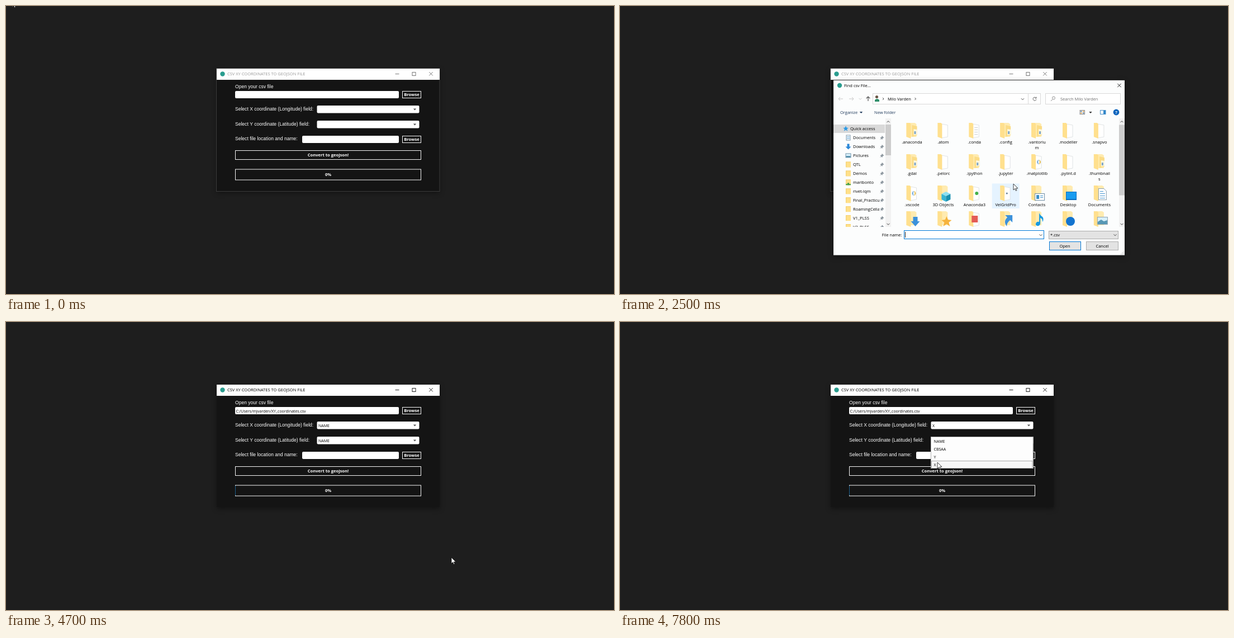
Recreate the animation shown at these times as an HTML page with a canvas. Size 1088 by 515 pixels, loop 8000 ms.

```html
<!DOCTYPE html>
<html lang="en">
<head>
<meta charset="utf-8">
<title>CSV to GeoJSON</title>
<style>
html, body { margin: 0; width: 1088px; height: 515px; overflow: hidden; background: #1e1e1e; }
canvas { display: block; }
</style>
</head>
<body>
<canvas id="stage" width="1088" height="515"></canvas>
<script>
const c = document.getElementById('stage').getContext('2d');
const LOOP = 8000, STEP = 100, SCROLL = 78.5;
const UI = "7.5px 'Open Sans', 'Noto Sans', sans-serif";
const FIELD = "7px 'Open Sans', 'Noto Sans', sans-serif";
const BOLD = "bold 7.6px 'Open Sans', 'Noto Sans', sans-serif";
const LABEL = "8.55px 'Liberation Sans', Arial, sans-serif";
const BLUE = '#0078d7', TEAL = '#2a9d8f', GOLD = '#f6b62c';

// time, x, y of the pointer tip
const POINTER = [
  [200, 11, -9.5], [300, 34, 22], [600, 260, 150], [900, 530, 202], [1100, 638, 158], [1300, 698, 158],
  [1400, 698, 158], [1500, 722, 160], [1800, 724, 162], [2000, 724, 165], [2500, 704, 318], [2700, 704, 318],
  [3000, 800, 342], [3100, 803, 343], [3300, 803, 343], [3500, 856, 352], [3800, 856, 352], [4300, 812, 440],
  [4500, 805, 430], [4600, 805, 430], [4700, 797, 421], [4800, 735, 266], [4900, 690, 270], [5000, 690, 270],
  [5100, 674, 230], [5500, 652, 190], [5600, 645, 184], [5700, 645, 184], [6200, 571, 226], [6700, 571, 227],
  [7000, 588, 213], [7400, 588, 213], [7800, 568, 251]
];

const FILES = [
  '.anaconda:sub .atom:page .conda:lines .config:sub .vantoriu|m:sub .modeller:page .snapvo:page',
  '.gdal:sub .pelorc:page .ipython:sub .jupyter:page .matplotlib:code .pylint.d:page .thumbnail|s:sub',
  '.vscode:code 3D_Objects:cube Anaconda3:ring VelGridPro:dot Contacts:card Desktop:screen Documents:doc',
  'Downloads:down Favorites:star lab2:red Links:link Music:note FluxCrate:disc Pictures:photo',
  'pipwin:page Python37:page Saved|Games:spade Searches:lens TRV_Lab|Install_-|Plumo_KD:page Videos:film XY~coordin|ates.csv:sheet'
].map(row => row.split(' ').map(item => {
  const [name, kind] = item.split(':');
  return { lines: name.split('|').map(s => s.replace(/_/g, ' ').replace('~', '_')), kind };
}));
const ROWS = [223, 279, 335, 381, 427];
const PINNED = ['Documents', 'Downloads', 'Pictures', 'QTL', 'Demos', 'maribonto', 'rivet-lqm',
  'Final_Practicum', 'RoamingCellars', 'V1_PLSS', 'V2_PLSS'];
const CHOICES = ['NAME', 'CBSAA', 'Y', 'X'];

const PAGE = ['#fff', 'M-3-12L8-10V11L-3 13Z'];
const STAR = 'M0-9L2.5-3 9-2 4 2 6 9 0 5-6 9-4 2-9-2-2.5-3Z';
const DOWN = 'M-4-8H4V0H8L0 9-8 0H-4Z';
// fill colour and outline, relative to the icon centre
const ART = {
  sub: [['#fbdc86', 'M0-10L9-8V8L0 11Z'], ['#fff8e0', 'M3-3L9-2V7L3 8Z'], ['#7ea6c8', 'M4 1H7V6H4Z']],
  page: [PAGE],
  lines: [PAGE, ['#c9ced3', 'M0-6H6V-5H0ZM0-2H6V-1H0ZM0 2H6V3H0ZM0 6H6V7H0Z']],
  code: [PAGE, ['#5b9bd5', 'M0 0L2-4H3L2 0 3 4H2Z'], ['#e0b43a', 'M7 0L5-4H4L5 0 4 4H5Z']],
  cube: [['#8ce0f2', 'M-3 1L5-3 13 1 5 5Z'], ['#35b5d5', 'M-3 1L5 5V15L-3 11Z'], ['#168fb0', 'M13 1L5 5V15L13 11Z']],
  ring: [PAGE, ['#43b049', 'M1 0a3 3 0 1 0 6 0a3 3 0 1 0-6 0Z']],
  dot: [PAGE, ['#6b8299', 'M.5 0a1.6 1.6 0 1 0 3.2 0a1.6 1.6 0 1 0-3.2 0Z']],
  card: [['#6e8da3', 'M-4 0H14V13H-4Z'], ['#fff', 'M-3 1H13V12H-3Z'], ['#3a8fc7', 'M-1 3H4V10H-1ZM6 4H11V5H6ZM6 7H11V8H6Z']],
  screen: [['#0b6fc0', 'M-4-3H15V12H-4Z'], ['#189cf0', 'M-3-2H14V10H-3Z']],
  doc: [['#8ba0ae', 'M-2-9H8L13-4V12H-2Z'], ['#fff', 'M-1-8H8L12-4V11H-1Z'], ['#4a97d0', 'M1-4H7V-3H1ZM1 0H10V1H1ZM1 4H10V5H1ZM1 8H10V9H1Z']],
  down: [['#3b91db', DOWN, 6, 4]],
  star: [['#f6b33c', STAR, 6, 4]],
  red: [PAGE, ['#e35b55', 'M-5-6H6V6H-5Z']],
  link: [['#3b91db', 'M-3-7H10V6L6 2Q0 6 0 13Q-7 4 1-3Z', 2, 0]],
  note: [['#1799e0', 'M4-11Q6-6 10-4Q13 0 10 5Q10-1 6-2V8Q5 13 0 12Q-4 10-1 6Q1 4 4 5Z']],
  disc: [['#1374cf', 'M-4 4a8 8 0 1 0 16 0a8 8 0 1 0-16 0Z']],
  photo: [['#8fa2ae', 'M-4-4H15V10H-4Z'], ['#d7f0fc', 'M-3-3H14V9H-3Z'], ['#5798b5', 'M-3 5L3 1 8 4 14 2V9H-3Z']],
  spade: [['#aab1b7', 'M-4-4L5-8 10 8 0 12Z'], ['#4b5359', 'M8-7Q18 1 14 6Q11 8 9 5L11 11H4L7 5Q2 8 1 3Q1-1 8-7Z']],
  lens: [['#a8a8a8', 'M1 4L3 6-6 13-8 11Z'], ['#7b98a8', 'M0-2a8 8 0 1 0 16 0a8 8 0 1 0-16 0Z'], ['#cdecfa', 'M1.5-2a6.5 6.5 0 1 0 13 0a6.5 6.5 0 1 0-13 0Z']],
  film: [['#263746', 'M-3-8H13V12H-3Z'], ['#3f88dd', 'M0-6H10V1H0Z'], ['#e2a63d', 'M0 3H10V10H0Z'],
    ['#fff', 'M-2-6h1v2h-1zm0 5h1v2h-1zm0 5h1v2h-1zm13-10h1v2h-1zm0 5h1v2h-1zm0 5h1v2h-1z']]
};

function rect(x, y, w, h, fill, line, width = 1) {
  if (fill) { c.fillStyle = fill; c.fillRect(x, y, w, h); }
  if (line) {
    c.strokeStyle = line; c.lineWidth = width;
    c.strokeRect(x + width / 2, y + width / 2, w - width, h - width);
  }
}
function text(s, x, y, color = '#000', font = UI, align = 'left') {
  c.font = font; c.fillStyle = color; c.textAlign = align;
  c.fillText(s, x, y);
}
function shape(d, x, y, fill, line, width = 1) {
  const p = new Path2D(d);
  c.save();
  c.translate(x, y);
  if (fill) { c.fillStyle = fill; c.fill(p); }
  if (line) { c.strokeStyle = line; c.lineWidth = width; c.stroke(p); }
  c.restore();
}
function disc(x, y, r, color) {
  c.fillStyle = color;
  c.beginPath(); c.arc(x, y, r, 0, 7); c.fill();
}
function clipped(x, y, w, h, draw) {
  c.save();
  c.beginPath(); c.rect(x, y, w, h); c.clip();
  draw();
  c.restore();
}
function shadowed(x, y, w, h, fill) {
  c.save();
  c.shadowColor = 'rgba(0,0,0,.4)'; c.shadowBlur = 9; c.shadowOffsetY = 3;
  rect(x, y, w, h, fill);
  c.restore();
}
const inside = (p, x, y, w, h) => p.x >= x && p.x < x + w && p.y >= y && p.y < y + h;
const chevron = (x, y, up, color = '#444') => shape(up ? 'M-2.5 1.2L0-1.3 2.5 1.2' : 'M-2.5-1.2L0 1.3 2.5-1.2', x, y, null, color);
const triangle = (x, y, color = '#333') => shape('M-2.7-1.4H2.7L0 1.6Z', x, y, color);

function pointerAt(t) {
  const i = POINTER.findIndex(k => k[0] > t);
  if (i === 0) return { x: POINTER[0][1], y: POINTER[0][2] };
  const a = POINTER[i < 0 ? POINTER.length - 1 : i - 1], b = i < 0 ? a : POINTER[i];
  const k = b === a ? 0 : (t - a[0]) / (b[0] - a[0]);
  return { x: a[1] + (b[1] - a[1]) * k, y: a[2] + (b[2] - a[2]) * k };
}

function input(x, y, w, h, value) {
  c.fillStyle = '#fff';
  c.beginPath(); c.roundRect(x, y, w, h, 2); c.fill();
  text(value, x + 1.5, y + 9.6, '#000', FIELD);
}
function combo(y, value) {
  input(556.5, y, 183, 13.5, '');
  text(value, 559, y + 9.7, '#000', FIELD);
  triangle(731.5, y + 6.8, '#555');
}
function button(label, x, y, w, h, p) {
  const hot = p && inside(p, x, y, w, h);
  rect(x, y, w, h, hot ? GOLD : '#141414', '#f4f4f4');
  text(label, x + w / 2, y + h / 2 + 2.9, hot ? '#111' : '#fff', BOLD, 'center');
}
function popup(y, p) {
  rect(556, y, 183.5, 57, '#fdfdfd', '#b4b4b4');
  CHOICES.forEach((name, i) => {
    const top = y + 1 + 14 * i;
    if (p.y >= top && p.y < top + 14) rect(557, top, 181.5, 14, '#f7f7f7', '#a9a9a9');
    text(name, 561.5, top + 9.6, '#000', FIELD);
  });
}

function mainWindow(t, p, dialog) {
  const active = t >= 4700 || t >= 1600 && t < 1800;
  const ink = active ? '#000' : '#999', glyph = active ? '#222' : '#777';
  const loaded = t >= 4700;
  const xOpen = t >= 5800 && t < 6500, yOpen = t >= 7200;
  const free = !dialog && !xOpen && !yOpen ? p : null;

  shadowed(377, 112, 399, 219, '#141414');
  if (!active) rect(376, 111, 400.5, 221, null, '#3b3b3b');
  rect(377, 112, 399, 20, '#fff');
  disc(387.5, 121.5, 4.2, TEAL);
  text('CSV XY COORDINATES TO GEOJSON FILE', 396, 124.4, ink);
  shape('M-3.5 0H3.5', 700, 121.5, null, glyph);
  rect(726.5, 118, 7, 7, null, glyph);
  shape('M-3.2-3.2L3.2 3.2M3.2-3.2L-3.2 3.2', 760.5, 121.3, null, glyph);

  text('Open your csv file', 410, 147, '#fff', LABEL);
  input(410, 152, 293, 13, loaded ? 'C:/Users/mjvarden/XY_coordinates.csv' : '');
  button('Browse', 709, 152, 34, 13, free);
  text('Select X coordinate (Longitude) field:', 410, 187, '#fff', LABEL);
  combo(178, t >= 6500 ? 'X' : loaded ? 'NAME' : '');
  text('Select Y coordinate (Latitude) field:', 410, 213.7, '#fff', LABEL);
  combo(205, loaded ? 'NAME' : '');
  text('Select file location and name:', 410, 240.3, '#fff', LABEL);
  input(530, 232, 173, 13, '');
  button('Browse', 709, 232, 34, 13, free);
  button('Convert to geojson!', 410, 258, 333, 17, free);
  button('0%', 410, 291.5, 333, 20);
  if (t >= 1500) rect(410, 293, 1, 17, '#1c5d8a');
  if (xOpen) popup(178, p);
  if (yOpen) popup(205, p);
}

function folder(x, y, kind) {
  if (kind === 'sheet') {
    shape('M-11-15H6L12-9V14H-11Z', x, y, '#fff', '#b5b5b5', .8);
    return rect(x - 14, y - 7, 14, 14, '#1e7a45');
  }
  const [base, ...rest] = ART[kind], paper = base === PAGE;
  if (paper) shape(PAGE[1], x, y, PAGE[0], '#d9dcdf', .8);
  else shape('M-10-14H5L8-12V11H-10Z', x, y, '#ffebb0');
  shape('M-10-14H-4L-2-12V14L-10 11Z', x, y, '#ffe08e');
  for (const [fill, d, dx = 0, dy = 0] of paper ? rest : ART[kind]) shape(d, x + dx, y + dy, fill);
}

function fileList(t, p) {
  const scroll = SCROLL * Math.min(1, Math.max(0, (t - 2600) / 300));
  FILES.forEach((row, r) => row.forEach(({ lines, kind }, i) => {
    const x = 522.5 + 55.9 * i, y = ROWS[r] - scroll;
    const box = [x - 24.5, y - 17.5, 49, 35 + 9.5 * lines.length];
    if (kind === 'sheet' && t >= 3600) rect(...box, t < 4500 ? '#cce8ff' : '#d9d9d9');
    else if (inside(p, ...box) && (t < 3100 || t > 3300)) rect(...box, '#e5f3ff');
    folder(x, y, kind);
    lines.forEach((s, n) => text(s, x, y + 22.7 + 10 * n, '#000', UI, 'center'));
  }));
  return scroll;
}

function sidebar() {
  rect(382, 212, 92, 15, '#d9d9d9');
  c.save(); c.translate(404, 219); c.scale(.52, .52);
  shape(STAR, 0, 0, '#2b9ae5');
  c.restore();
  text('Quick access', 412, 222);
  PINNED.forEach((name, i) => {
    const y = 235.5 + 15.95 * i;
    if (i === 0) { rect(404.5, y - 5, 8, 10, '#fff', '#7c98ab'); rect(406, y - 2, 5, 1, '#4a97d0'); rect(406, y + 1, 5, 1, '#4a97d0'); }
    else if (i === 1) shape('M-2-5H2V0H5L0 5-5 0H-2Z', 408.5, y, '#2b88d8');
    else if (i === 2) { rect(403.5, y - 4, 10, 8, '#d7f0fc', '#7c98ab'); rect(404.5, y + 1, 8, 2, '#397c9b'); }
    else { rect(404, y - 5, 9, 10, '#f4ce6b'); rect(405, y - 4, 8, 9, '#ffe08a'); }
    if (i === 5) { rect(404, y + 3, 9, 2, '#43a047'); rect(407, y + 1, 3, 4, '#43a047'); }
    clipped(415, y - 7, 49, 15, () => text(name, 417, y + 2.8));
    shape('M0-3L3 0 1 .5 0 3-3 0-.5-1ZM-1.5 1.5L-3.5 3.5', 469, y, '#8a949c', '#8a949c', .7);
  });
}

function fileDialog(t, p) {
  const early = t < 2700, picked = t >= 3600, hot = inside(p, 768, 421, 57, 16);
  shadowed(382, 132, 521, 313.5, '#3a3a3a');
  rect(382, 133, 521, 312.5, '#fcfdfd');
  disc(393, 142, 4.2, TEAL);
  text('Find csv File...', 401, 145);
  shape('M-3.2-3.2L3.2 3.2M3.2-3.2L-3.2 3.2', 893.5, 142, null, '#222');

  shape('M4 0H-4M-1-3L-4 0-1 3', 395, 166, null, '#c8c8c8');
  shape('M-4 0H4M1-3L4 0 1 3', 414, 166, null, '#c8c8c8');
  chevron(430, 166, false, '#ccc');
  shape('M0 4V-4M-3.3-.8L0-4 3.3-.8', 444, 166, null, '#555', 1.2);
  rect(452, 156, 301, 20, '#fff', '#d9d9d9');
  rect(730, 156, 1, 20, '#d9d9d9');
  shape('M-4 5V2Q0-2 4 2V5Z', 460, 166, '#2f8f6b');
  disc(459.5, 162.5, 2.6, '#6b5747');
  shape('M-1-2L1 0-1 2', 471, 166, null, '#444');
  text('Milo Varden', 479, 168.5);
  shape('M-1-2L1 0-1 2', 528.5, 166, null, '#444');
  chevron(720.5, 166.5);
  shape('M2.6-1.5A3 3 0 1 0 3 1M3-3.5V-1H.5', 742, 166, null, '#666');
  rect(761, 156, 135, 20, '#fff', '#d9d9d9');
  shape('M-1 1L-4 4M-1.5-1.5a2.5 2.5 0 1 0 5 0a2.5 2.5 0 1 0-5 0', 775, 166, null, '#777', .8);
  text('Search Milo Varden', 788, 168.5, '#6d6d6d');

  text('Organize', 394, 193, '#1e395b');
  triangle(431.5, 190.5, '#1e395b');
  text('New folder', 455, 193, '#1e395b');
  rect(822.5, 186, 9.5, 8, '#fff', '#8a8a8a');
  for (let i = 0; i < 4; i++) rect(824 + 4 * (i % 2), 187.5 + 3 * (i >> 1), 2.5, 2, i % 3 ? '#d49b4b' : '#547b9e');
  triangle(842, 190.5);
  rect(859, 186, 10.5, 8, '#fff', '#4b91c9');
  rect(865, 187, 4, 6, '#3287ca');
  disc(888, 190, 5.4, '#0c64bd');
  text('?', 888, 193, '#fff', BOLD, 'center');

  let scroll = 0;
  clipped(382, 201, 94, 194, sidebar);
  if (t >= 2100) clipped(487, 201, 406, 194, () => { scroll = fileList(t, p); });
  rect(475, 201, 10, 194, '#f2f2f2');
  rect(475, 212, 10, 55, '#cdcdcd');
  rect(893, 201, 10, 194, '#f2f2f2');
  rect(893, 212.5 + scroll / SCROLL * 45, 10, 126, '#cdcdcd');
  for (const x of [480, 898]) { chevron(x, 207, true); chevron(x, 390); }

  const fill = early ? '#e3e3e3' : '#fdfdfd';
  text('File name:', 504.5, 411.8, '#000', UI, 'right');
  rect(508, 401, 251, 16, '#fff', picked ? '#8a8a8a' : BLUE);
  if (picked) text('XY_coordinates.csv', 510.5, 412);
  else rect(510, 404, 1, 10, '#222');
  chevron(753, 409.5);
  rect(767, 402, 125, 15, fill, '#adadad');
  text('*.csv', 770, 412);
  chevron(886, 409.5);
  rect(768, 421, 57, 16, hot ? '#cde8fa' : fill, BLUE);
  text('Open', 796, 431.8, '#000', UI, 'center');
  rect(834, 421, 58, 16, fill, '#adadad');
  text('Cancel', 863, 431.8, '#000', UI, 'center');
  for (let i = 0; i < 6; i++) {
    const col = i < 3 ? 2 : i < 5 ? 1 : 0, row = i < 3 ? i : i < 5 ? i - 2 : 2;
    rect(896 + 2.3 * col, 438.5 + 2.3 * row, 1.2, 1.2, '#b5b5b5');
  }

  if (t >= 3200 && t < 3400) {
    rect(800, 355, 143, 33, '#fff', '#8a8a8a');
    ['Contains movies and other video files.', 'Date created: 1/13/2020 11:07 AM', 'Folders: Captures']
      .forEach((s, i) => text(s, 804.5, 364.6 + 10 * i, '#575757'));
  }
}

function pointer(p, dialog) {
  if (!dialog && inside(p, 410, 152, 293, 13)) shape('M-2-5.5H2M0-5.5V5.5M-2 5.5H2', p.x, p.y, null, '#111');
  else shape('M0 0V11L2.6 8.6 4.3 12.4 6 11.6 4.3 8H8Z', p.x, p.y, '#fff', '#111', .8);
}

function frame(now) {
  const t = Math.floor(now % LOOP / STEP) * STEP;
  const p = pointerAt(t), dialog = t >= 2000 && t < 4700;
  rect(0, 0, 1088, 515, '#1e1e1e');
  rect(0, 514, 1088, 1, '#191919');
  mainWindow(t, p, dialog);
  if (dialog) fileDialog(t, p);
  pointer(p, dialog);
  requestAnimationFrame(frame);
}
requestAnimationFrame(frame);
</script>
</body>
</html>
```
